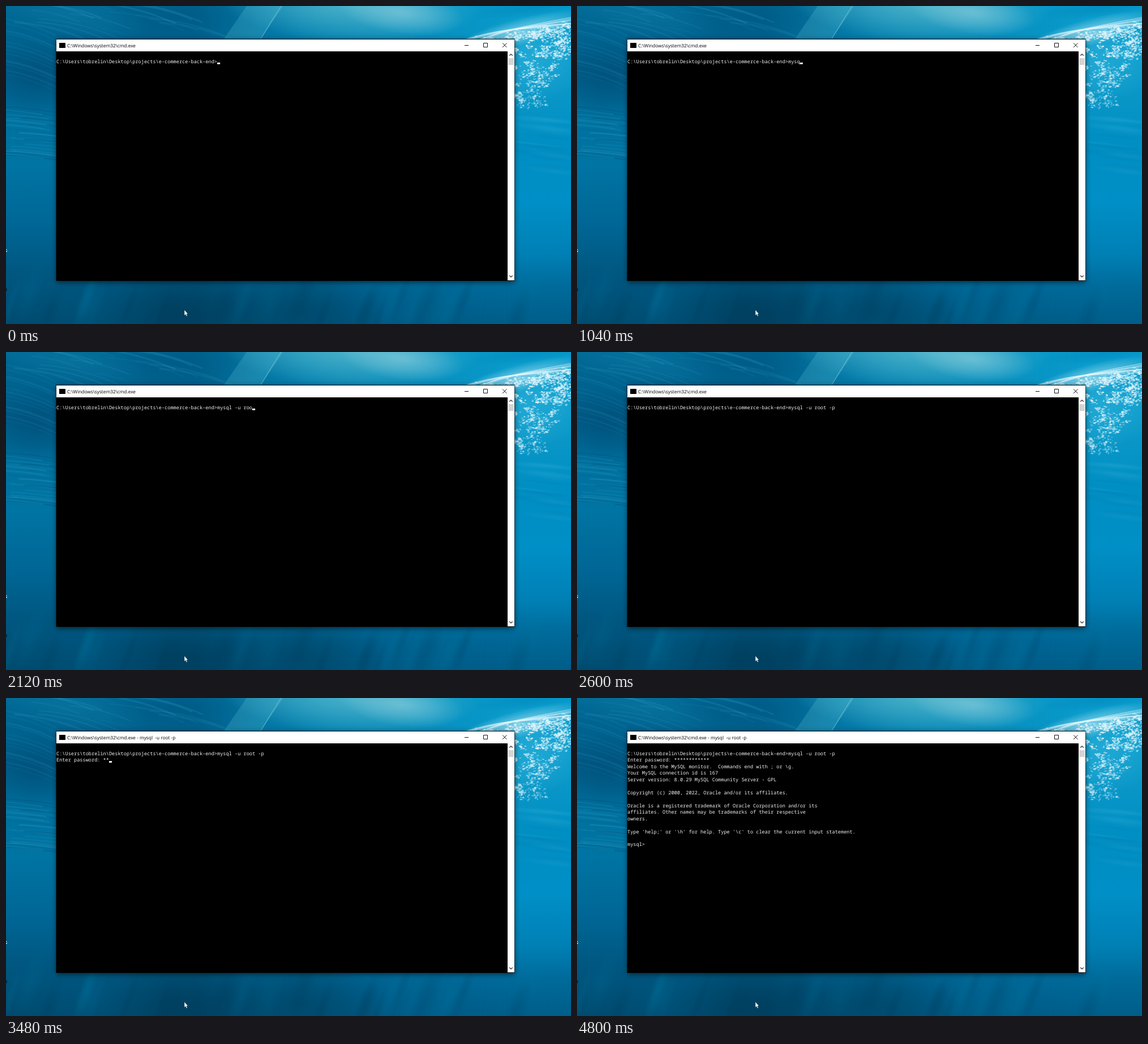
These frames come from a looping animation (998x561 px, 4840 ms). An HTML page with a canvas:

```html
<!DOCTYPE html>
<html lang="en">
<head>
<meta charset="utf-8">
<title>Terminal</title>
<style>
html, body { margin: 0; width: 100%; height: 100%; overflow: hidden; background: #006a9c; }
canvas { display: block; }
</style>
</head>
<body>
<canvas id="stage" width="998" height="561"></canvas>
<script>
const W = 998, H = 561, LOOP = 4840;
const ctx = document.getElementById('stage').getContext('2d');

const CELL = 5.164, ROW = 11.46, LEFT = 89, BASE = 101;
const MONO = '8.6px "Noto Sans Mono", "DejaVu Sans Mono", monospace';
const SANS = '8.3px "Open Sans", "Noto Sans", sans-serif';
const PROMPT = 'C:\\Users\\tobrelin\\Desktop\\projects\\e-commerce-back-end>';
const COMMAND = 'mysql -u root -p';
const TITLE = 'C:\\Windows\\system32\\cmd.exe';
const OUTPUT = [
  'Welcome to the MySQL monitor.  Commands end with ; or \\g.',
  'Your MySQL connection id is 167',
  'Server version: 8.0.29 MySQL Community Server - GPL',
  '',
  'Copyright (c) 2000, 2022, Oracle and/or its affiliates.',
  '',
  'Oracle is a registered trademark of Oracle Corporation and/or its',
  'affiliates. Other names may be trademarks of their respective',
  'owners.',
  '',
  "Type 'help;' or '\\h' for help. Type '\\c' to clear the current input statement.",
  '',
  'mysql>'
];

// Typing progress as [time, characters] pairs
const COMMAND_KEYS = [[560, 0], [1040, 4], [1680, 8], [2480, 16]];
const PASSWORD_KEYS = [[3320, 0], [3480, 2], [4040, 9], [4280, 12]];
const ENTER_COMMAND = 2960, ENTER_PASSWORD = 4560;
const HIDDEN_CARET = [[2560, 2960], [4480, LOOP]];

function randomizer(seed) {
  return () => (seed = (seed * 16807) % 2147483647) / 2147483647;
}

function typed(keys, t) {
  if (t < keys[0][0]) return keys[0][1];
  for (let i = 1; i < keys.length; i++) {
    const [t0, n0] = keys[i - 1], [t1, n1] = keys[i];
    if (t < t1) return Math.floor(n0 + (n1 - n0) * (t - t0) / (t1 - t0));
  }
  return keys[keys.length - 1][1];
}

function makeLayer(draw) {
  const layer = document.createElement('canvas');
  layer.width = W;
  layer.height = H;
  draw(layer.getContext('2d'));
  return layer;
}

function linear(g, x0, y0, x1, y1, stops) {
  const fill = g.createLinearGradient(x0, y0, x1, y1);
  stops.forEach(([at, color]) => fill.addColorStop(at, color));
  return fill;
}

function glow(g, x, y, rx, ry, rgb, alpha, angle = 0) {
  g.save();
  g.translate(x, y);
  g.rotate(angle);
  g.scale(rx, ry);
  const fill = g.createRadialGradient(0, 0, 0, 0, 0, 1);
  fill.addColorStop(0, `rgba(${rgb},${alpha})`);
  fill.addColorStop(0.5, `rgba(${rgb},${alpha * 0.55})`);
  fill.addColorStop(1, `rgba(${rgb},0)`);
  g.fillStyle = fill;
  g.fillRect(-1, -1, 2, 2);
  g.restore();
}

function stroke(g, color, width, path) {
  g.strokeStyle = color;
  g.lineWidth = width;
  g.beginPath();
  path(g);
  g.stroke();
}

function polygon(g, color, points) {
  g.fillStyle = color;
  g.beginPath();
  points.forEach(([x, y]) => g.lineTo(x, y));
  g.closePath();
  g.fill();
}

function drawOcean(g) {
  const rand = randomizer(71);
  const left = linear(g, 0, 0, 0, H, [
    [0, '#006996'], [0.2, '#005c88'], [0.36, '#00719f'], [0.5, '#0074a3'],
    [0.68, '#006796'], [0.85, '#00567f'], [1, '#004e74']
  ]);
  const right = linear(g, 0, 0, 0, H, [
    [0, '#079bcb'], [0.25, '#0b98c8'], [0.42, '#008fc3'], [0.62, '#008fc6'],
    [0.78, '#0080b5'], [0.88, '#006b9b'], [1, '#005d89']
  ]);
  g.fillStyle = left;
  g.fillRect(0, 0, W, H);

  // Blend the sunlit side in from the left
  g.drawImage(makeLayer(lit => {
    lit.fillStyle = right;
    lit.fillRect(0, 0, W, H);
    lit.globalCompositeOperation = 'destination-in';
    lit.fillStyle = linear(lit, 330, 0, 900, 0, [[0, 'rgba(0,0,0,0)'], [0.35, 'rgba(0,0,0,.55)'], [1, '#000']]);
    lit.fillRect(0, 0, W, H);
  }), 0, 0);

  glow(g, 55, 130, 90, 70, '0,66,104', 0.4);
  glow(g, 310, 15, 150, 60, '0,78,118', 0.45);
  glow(g, 110, 15, 150, 40, '20,128,170', 0.35, 0.2);
  glow(g, 320, 545, 150, 85, '0,54,82', 0.65);
  glow(g, 520, 540, 150, 80, '0,60,90', 0.55);
  glow(g, 20, 560, 130, 60, '0,72,106', 0.4);
  polygon(g, 'rgba(90,190,212,.25)', [[425, 0], [490, 0], [450, 58], [385, 58]]);
  glow(g, 610, -5, 230, 70, '100,192,208', 0.75, 0.04);
  glow(g, 700, 12, 110, 38, '160,216,226', 0.5, 0.12);

  // Streaks and light rays under the surface
  for (let i = 0; i < 32; i++) {
    const y = 178 + rand() * 85, x = -30 + rand() * 70;
    const rgb = i % 3 ? '44,156,192' : '0,74,112';
    stroke(g, `rgba(${rgb},${0.1 + rand() * 0.25})`, 0.8 + rand() * 2, p => {
      p.moveTo(x, y);
      p.quadraticCurveTo(x + 35, y + 1, x + 90, y + 9);
    });
  }
  for (let i = 0; i < 16; i++) {
    const x = rand() * 300, y = rand() * 55 - 8, length = 60 + rand() * 90;
    stroke(g, `rgba(50,156,192,${0.08 + rand() * 0.16})`, 1 + rand() * 3, p => {
      p.moveTo(x, y);
      p.quadraticCurveTo(x + length / 2, y + 4, x + length, y + length * 0.25);
    });
  }
  for (let i = 0; i < 12; i++) {
    const y = 20 + i * 9 + rand() * 8;
    stroke(g, `rgba(30,138,178,${0.06 + rand() * 0.2})`, 1 + rand() * 3, p => {
      p.moveTo(0, y);
      p.quadraticCurveTo(45, y + 8, 89, y + 30);
    });
  }
  stroke(g, 'rgba(150,216,228,.5)', 1.2, p => {
    p.moveTo(486, 0);
    p.quadraticCurveTo(468, 28, 450, 58);
  });
  for (let i = 0; i < 30; i++) {
    glow(g, rand() * W, 500 + rand() * 60, 8 + rand() * 14, 60, i % 2 ? '0,50,78' : '0,118,160', 0.18, 0.35);
  }
  for (let i = 0; i < 16; i++) {
    glow(g, 900 + rand() * 98, 200 + rand() * 120, 60, 3 + rand() * 5, i % 2 ? '0,122,176' : '40,170,212', 0.25, 0.12);
  }

  drawSplash(g, rand);
}

function drawSplash(g, rand) {
  glow(g, 925, 90, 125, 80, '40,174,216', 0.75, -0.2);
  glow(g, 900, 48, 125, 24, '175,228,242', 0.65, -0.27);
  glow(g, 925, 3, 110, 16, '0,132,184', 0.5, -0.12);
  for (let i = 0; i < 13; i++) {
    const rise = rand() * 12;
    stroke(g, `rgba(232,250,255,${0.2 + rand() * 0.45})`, 0.6 + rand() * 1.6, p => {
      p.moveTo(790 + rand() * 60, 60 + rand() * 8);
      p.bezierCurveTo(870, 48 - rise, 925, 30 + rise, 998, 14 + rise + rand() * 14);
    });
  }
  // Spray gathers in clumps along the crest and thins out as it falls
  for (let clump = 0; clump < 130; clump++) {
    const crest = clump < 45, fall = Math.pow(rand(), 1.2);
    const cx = crest ? 825 + rand() * 173 : 898 + rand() * (105 - fall * 55);
    const cy = crest ? 62 - (cx - 825) * 0.2 + rand() * 14 : 48 + fall * 132 - (cx - 898) * 0.12;
    const reach = 4 + rand() * 7, bright = crest ? 0.8 : 0.9 - fall * 0.35;
    for (let i = 0; i < 13; i++) {
      const x = cx + (rand() + rand() - 1) * reach * 1.6, y = cy + (rand() + rand() - 1) * reach;
      const size = 0.7 + rand() * 2;
      g.fillStyle = `rgba(228,248,254,${bright * (0.35 + rand() * 0.65)})`;
      g.fillRect(x, y, size * 1.5, size);
    }
  }
}

function drawWindow(g) {
  g.save();
  g.shadowColor = 'rgba(0,0,0,.6)';
  g.shadowBlur = 9;
  g.shadowOffsetY = 2;
  g.fillStyle = '#000';
  g.fillRect(88.5, 58, 810, 427);
  g.restore();

  g.fillStyle = '#fff';
  g.fillRect(89, 59, 809, 21);
  g.fillRect(886, 80, 12, 404);
  g.fillStyle = '#000';
  g.fillRect(89, 80, 797, 404);
  g.fillRect(94, 65, 11, 9);
  g.fillStyle = '#d5d5d5';
  g.fillRect(887, 92, 10, 12);

  stroke(g, '#111', 1, p => {
    p.moveTo(810, 69.5);
    p.lineTo(817, 69.5);
    p.rect(843.5, 65.5, 7, 7);
    p.moveTo(877, 65.5);
    p.lineTo(884.5, 73);
    p.moveTo(884.5, 65.5);
    p.lineTo(877, 73);
  });
  stroke(g, '#333', 1.3, p => {
    for (const [y, dir] of [[86, 1], [477, -1]]) {
      p.moveTo(889.3, y + 1.5 * dir);
      p.lineTo(892, y - 1.2 * dir);
      p.lineTo(894.7, y + 1.5 * dir);
    }
  });
}

function drawPointer(g) {
  const shape = [[315, 536], [315, 546], [317.2, 544], [318.8, 547.4], [320.4, 546.6], [318.9, 543.4], [321.4, 543.2]];
  polygon(g, '#fff', shape);
  stroke(g, '#173a4c', 0.6, p => {
    shape.forEach(([x, y]) => p.lineTo(x, y));
    p.closePath();
  });
}

function drawDesktop(g) {
  drawOcean(g);
  g.fillStyle = '#dfe8ec';
  g.fillRect(0, 429, 1.5, 5);
  g.fillStyle = '#04222f';
  g.fillRect(0, 430, 1, 2);
  g.fillRect(0, 498, 1.5, 5);
  drawWindow(g);
  drawPointer(g);
}

// Console text sits on a fixed character grid
function drawLine(text, row) {
  for (let i = 0; i < text.length; i++) {
    if (text[i] !== ' ') ctx.fillText(text[i], LEFT + i * CELL, BASE + row * ROW);
  }
}

function drawConsole(t) {
  const lines = ['' + PROMPT + COMMAND.slice(0, typed(COMMAND_KEYS, t))];
  if (t >= ENTER_COMMAND) lines.push('Enter password: ' + '*'.repeat(typed(PASSWORD_KEYS, t)));
  if (t >= ENTER_PASSWORD) lines.push(...OUTPUT);

  ctx.font = MONO;
  ctx.fillStyle = '#f2f2f2';
  lines.forEach(drawLine);

  if (!HIDDEN_CARET.some(([from, to]) => t >= from && t < to)) {
    const row = lines.length - 1;
    ctx.fillStyle = '#fff';
    ctx.fillRect(LEFT + lines[row].length * CELL, BASE - 1.2 + row * ROW, CELL, 2.8);
  }
}

const desktop = makeLayer(drawDesktop);
const start = performance.now();

function frame() {
  const t = (performance.now() - start) % LOOP;
  ctx.drawImage(desktop, 0, 0);
  ctx.textRendering = 'geometricPrecision';
  ctx.font = SANS;
  ctx.fillStyle = '#000';
  ctx.fillText(TITLE + (t >= ENTER_COMMAND ? ' - mysql  -u root -p' : ''), 108, 72.7);
  drawConsole(t);
  requestAnimationFrame(frame);
}
frame();
</script>
</body>
</html>
```
